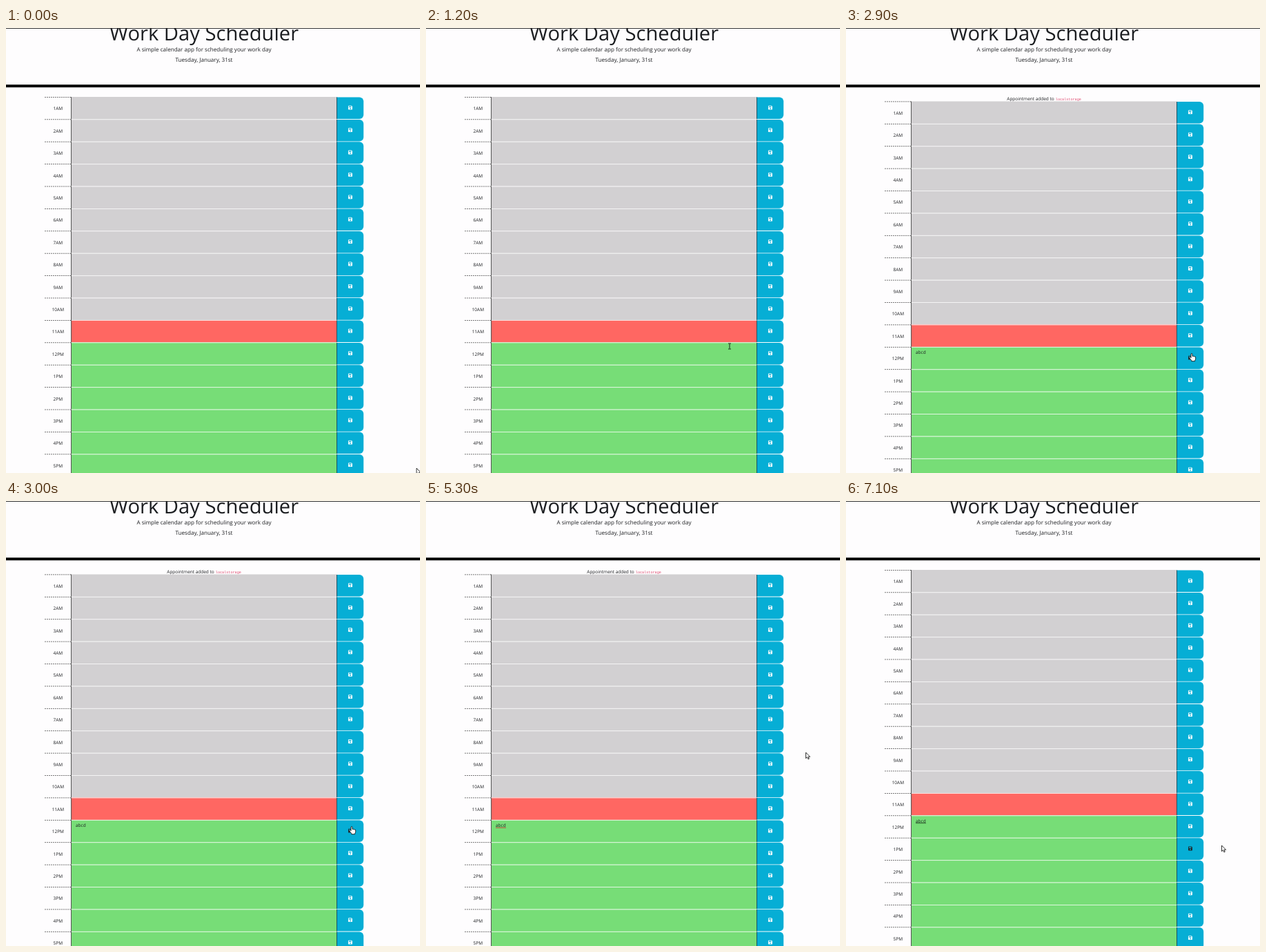
Write an HTML page with a canvas that moves like this. It is 600x646 px and loops after 7.2 s.

```html
<!DOCTYPE html>
<html lang="en">
<head>
<meta charset="utf-8">
<title>Work Day Scheduler</title>
<style>
  html, body { margin: 0; width: 100%; height: 100%; overflow: hidden; background: #fefdfe; }
  canvas { display: block; }
</style>
</head>
<body>
<canvas id="stage" width="600" height="646"></canvas>
<script>
const ctx = document.getElementById('stage').getContext('2d');
ctx.textRendering = 'geometricPrecision';
const LOOP = 7200, STEP = 100;
const SANS = '"Open Sans", sans-serif', MONO = '"Liberation Mono", monospace';
const BLUE = '#06aed5', INK = '#1c1e21', PAGE = '#fefdfe';
const LEFT = 56, AREA = 94, SAVE = 479, RIGHT = 518.2, ROW = 32.4;
const NOW = 10, NOON = 11;

// Pointer path: time, x, y
const path = [
  [0, 595, 639], [1200, 440, 462], [1600, 436, 470], [2100, 436, 470],
  [2400, 487, 470.5], [2700, 501, 472.5], [4600, 501, 472.5],
  [5000, 550.5, 365], [5800, 550.5, 365], [6500, 509.5, 505.5],
  [6900, 509.5, 505.5], [7100, 544.5, 500]
];

const clamp = v => Math.max(0, Math.min(1, v));

function pointerAt(t) {
  let i = 0;
  while (i < path.length - 2 && t > path[i + 1][0]) i++;
  const [t0, x0, y0] = path[i], [t1, x1, y1] = path[i + 1];
  const p = clamp((t - t0) / (t1 - t0)), e = p * p * (3 - 2 * p);
  return [x0 + (x1 - x0) * e, y0 + (y1 - y0) * e];
}

function rect(x, y, w, h, color) {
  ctx.fillStyle = color;
  ctx.fillRect(x, y, w, h);
}

function roundRect(x, y, w, h, radius, color) {
  ctx.fillStyle = color;
  ctx.beginPath();
  ctx.roundRect(x, y, w, h, radius);
  ctx.fill();
}

function text(str, x, y, size, align = 'center', color = INK, family = SANS) {
  ctx.font = `${size}px ${family}`;
  ctx.textAlign = align;
  ctx.fillStyle = color;
  ctx.fillText(str, x, y);
}

function shape(d, x, y, fill, stroke, width) {
  const p = new Path2D(d);
  ctx.save();
  ctx.translate(x, y);
  ctx.lineWidth = width;
  ctx.lineJoin = 'round';
  ctx.strokeStyle = stroke;
  if (fill) {
    ctx.fillStyle = fill;
    ctx.fill(p);
  }
  ctx.stroke(p);
  ctx.restore();
}

function drawHeader() {
  rect(0, 0, 600, 646, PAGE);
  text('Work Day Scheduler', 287, 17.6, 29.16);
  text('A simple calendar app for scheduling your work day', 287, 34.4, 8.1);
  text('Tuesday, January, 31st', 287, 48.5, 8.1);
  rect(0, 82.2, 600, 4, '#000');
  rect(0, 0, 600, 1, '#333');
}

// How far a row's icon has turned dark under the pointer
function heat(row, t) {
  if (row === NOON) return clamp((t - 2300) / 300) * clamp((4900 - t) / 100);
  if (row === NOON + 1) return clamp((t - 6300) / 300);
  return 0;
}

function drawIcon(y, dark) {
  const mix = (a, b) => Math.round(a + (b - a) * dark);
  const color = `rgb(${mix(255, 33)},${mix(255, 37)},${mix(255, 41)})`;
  roundRect(496.1, y - 2.9, 5.8, 5.8, [0.6, 1.5, 0.6, 0.6], color);
  rect(497, y - 2.1, 3.4, 1.5, BLUE);
  roundRect(498.1, y + 0.3, 1.8, 1.8, 0.9, BLUE);
}

function drawRow(i, top, t) {
  const y = top + i * ROW, hour = i + 1;
  for (let x = LEFT; x < AREA; x += 3) rect(x, y, 2, 0.8, '#555');
  text((hour > 12 ? hour - 12 : hour) + (hour < 12 ? 'AM' : 'PM'), 75.3, y + 19.3, 6.48);

  rect(AREA, y, SAVE - AREA, ROW, i < NOW ? '#d2d0d2' : i === NOW ? '#ff6762' : '#77dd77');
  if (i) rect(AREA, y, SAVE - AREA, 0.9, 'rgba(255,255,255,.85)');
  rect(AREA, y, 1, ROW, '#555');

  roundRect(SAVE, y + 0.5, RIGHT - SAVE, ROW - 0.8, [0, 6, 6, 0], BLUE);
  rect(SAVE, y + 0.5, 0.9, ROW - 0.8, '#1b4855');
  drawIcon(y + 15.7, heat(i, t));
}

function drawEntry(top, t) {
  const y = top + NOON * ROW, focused = t >= 1800 && t < 2800;
  const typed = 'abcd'.slice(0, Math.max(0, Math.floor((t - 1800) / 100)));
  text(typed, 101, y + 10.2, 6.48, 'left');
  if (focused) {
    const caret = 101 + ctx.measureText(typed).width;
    rect(caret, y + 3.6, 0.8, 8, '#000');
    ctx.strokeStyle = '#101010';
    ctx.lineWidth = 1.2;
    ctx.beginPath();
    ctx.roundRect(AREA + 0.6, y + 1, SAVE - AREA, ROW - 1.2, 1);
    ctx.stroke();
  }
  if (t >= 3300) rect(101, y + 10.9, 15, 0.9, t < 7000 ? '#c43c36' : '#2d5a2d');
}

const ARROW = 'M0 0V8.6L2 6.8L3.4 9.8L4.8 9.2L3.5 6.3H6.1Z';
const BEAM = 'M-2-4H-.5L0-3.6L.5-4H2M0-3.6V3.6M-2 4H-.5L0 3.6L.5 4H2';
const HAND = 'M-1 .7Q0-.7 1 .7V4Q2 3.3 2.7 4.3Q3.6 3.6 4.3 4.7Q5.6 4.3 5.7 5.6V7.6' +
  'Q5.6 9 4.7 9.8V11.2H-.3V10Q-2 8.2-3.3 6.2Q-3.2 5-2.6 5Q-2 4.8-1 6.2Z';

function drawPointer(t, top) {
  const [x, y] = pointerAt(t);
  if (y < top || x < AREA || x > RIGHT) shape(ARROW, x, y, '#fff', '#000', 0.8);
  else if (x < SAVE) shape(BEAM, x, y, '', '#111', 0.9);
  else shape(HAND, x, y, '#fff', '#000', 0.8);
}

function draw(t) {
  const saved = t >= 2800 && t < 7000, top = saved ? 106.5 : 100;
  drawHeader();
  if (saved) {
    text('Appointment added to', 233.3, 105, 6.48, 'left');
    text('localstorage', 303.8, 105, 5.15, 'left', '#e0486f', MONO);
  }
  for (let i = 0; i < 17; i++) drawRow(i, top, t);
  drawEntry(top, t);
  drawPointer(t, top);
}

const start = performance.now();
function tick() {
  const t = (performance.now() - start) % LOOP;
  draw(Math.floor(t / STEP) * STEP);
  requestAnimationFrame(tick);
}
tick();
</script>
</body>
</html>
```
